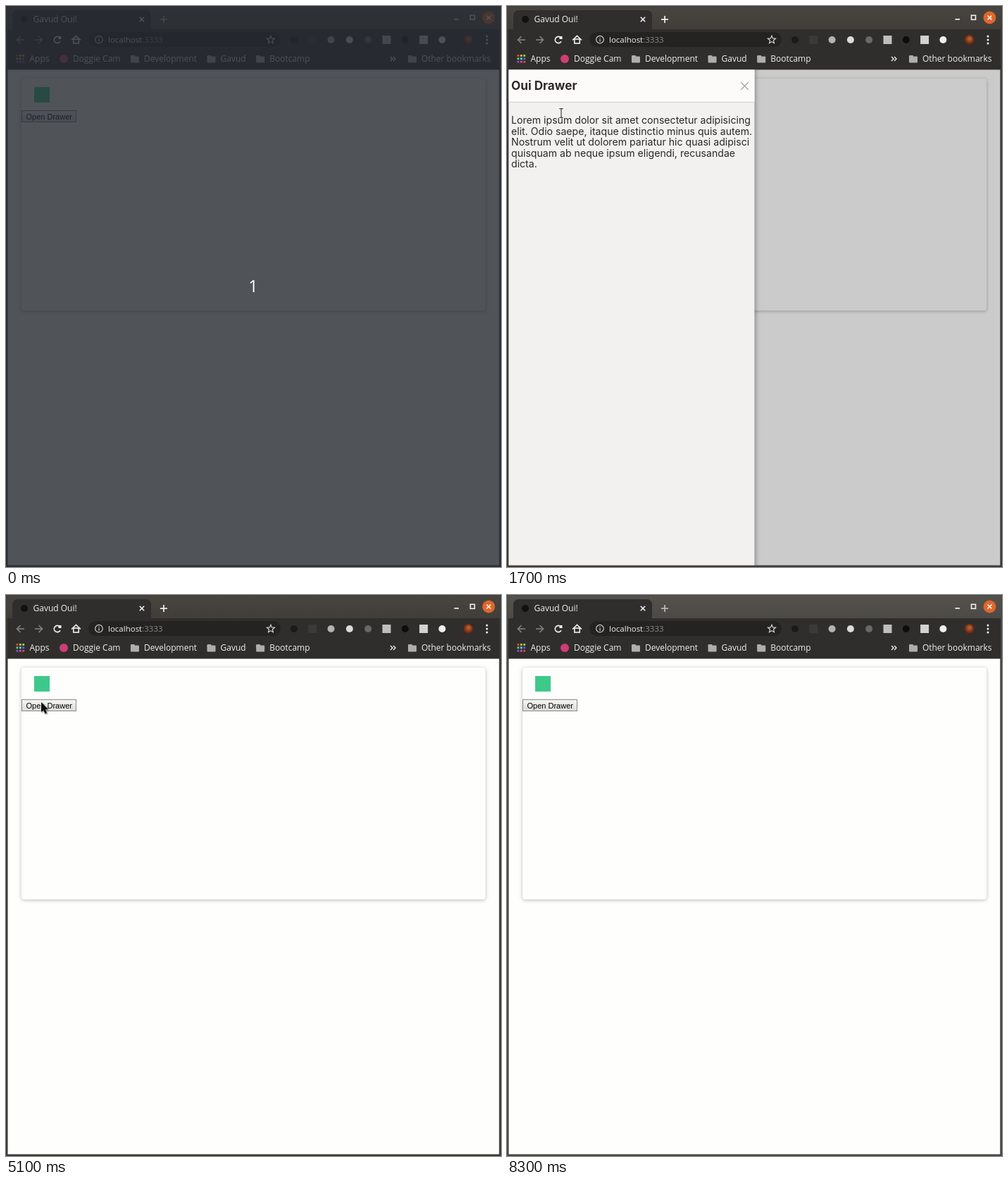
These frames come from a looping animation (703 by 796 pixels, 8400 ms). An HTML page with a canvas:

```html
<!DOCTYPE html>
<html lang="en">
<head>
<meta charset="utf-8">
<title>Drawer demo</title>
<style>
  html, body { margin: 0; width: 100%; height: 100%; overflow: hidden; background: #3c3a37; }
  canvas { display: block; }
</style>
</head>
<body>
<canvas id="stage" width="703" height="796"></canvas>
<script>
const g = document.getElementById('stage').getContext('2d');
const LOOP = 8400, STEP = 100, TURN = Math.PI * 2;
const UI = '"Open Sans", "Noto Sans", sans-serif';
const BODY = 'Inter, "Open Sans", sans-serif';
const LIGHT = '#f1f0ee', BAR = '#302e2d', DIM = '#858381', INK = '#0a0a0a';

const LOREM = [
  'Lorem ipsum dolor sit amet consectetur adipisicing',
  'elit. Odio saepe, itaque distinctio minus quis autem.',
  'Nostrum velit ut dolorem pariatur hic quasi adipisci',
  'quisquam ab neque ipsum eligendi, recusandae',
  'dicta.'
];

// pointer moves: start, end, and where each one arrives
const ENTRY = { x: 260, y: 28 };
const MOVES = [
  { from: 500, to: 1100, x: 77, y: 152 },
  { from: 2000, to: 2200, x: 86, y: 178 },
  { from: 2300, to: 2500, x: 135, y: 208 },
  { from: 2500, to: 2700, x: 309, y: 140 },
  { from: 2800, to: 3300, x: 347, y: 109 },
  { from: 3400, to: 3500, x: 332, y: 109 },
  { from: 4400, to: 4800, x: 50, y: 152 },
  { from: 5400, to: 5900, x: 579, y: 257 },
  { from: 6700, to: 7300, x: 640, y: 17 }
];

const clamp = v => Math.max(0, Math.min(1, v));
const span = (t, start, len) => clamp((t - start) / len);
const easeOut = p => 1 - Math.pow(1 - p, 2.83);

function rect(x, y, w, h, fill) {
  g.fillStyle = fill;
  g.fillRect(x, y, w, h);
}

function round(x, y, w, h, r, fill) {
  g.beginPath();
  g.roundRect(x, y, w, h, r);
  g.fillStyle = fill;
  g.fill();
}

function disc(x, y, r, fill) {
  g.beginPath();
  g.arc(x, y, r, 0, TURN);
  g.fillStyle = fill;
  g.fill();
}

function ring(x, y, r, color, width, a = 0, b = TURN) {
  g.beginPath();
  g.arc(x, y, r, a, b);
  g.strokeStyle = color;
  g.lineWidth = width;
  g.stroke();
}

function line(color, width, ...pts) {
  g.strokeStyle = color;
  g.lineWidth = width;
  g.beginPath();
  for (let i = 0; i < pts.length; i += 2) g.lineTo(pts[i], pts[i + 1]);
  g.stroke();
}

function cross(x, y, r, color, width) {
  line(color, width, x - r, y - r, x + r, y + r);
  line(color, width, x + r, y - r, x - r, y + r);
}

// a chevron with its tip at x, y; a negative size points right
function chevron(x, y, s, color, width) {
  line(color, width, x + s, y - Math.abs(s), x, y, x + s, y + Math.abs(s));
}

function text(s, x, y, font, color, align = 'left') {
  g.font = font;
  g.fillStyle = color;
  g.textAlign = align;
  g.fillText(s, x, y);
  return g.measureText(s).width;
}

function shadow(color, blur, x, y) {
  g.shadowColor = color;
  g.shadowBlur = blur;
  g.shadowOffsetX = x;
  g.shadowOffsetY = y;
}

function fade(y0, y1, top, bottom) {
  const f = g.createLinearGradient(0, y0, 0, y1);
  f.addColorStop(0, top);
  f.addColorStop(1, bottom);
  return f;
}

function titleBar(focused) {
  rect(0, 0, 703, 796, focused ? '#3c3a37' : '#474541');
  rect(1, 1, 701, 32, focused ? fade(0, 33, '#484540', '#413e3a') : fade(0, 33, '#55524d', '#4c4a46'));
  rect(2, 33, 699, 57, BAR);
  round(9, 6, 197, 28, [7, 7, 0, 0], BAR);
  disc(26, 19, 5, '#121110');
  text('Gavud Oui!', 38.5, 23, '12px ' + UI, LIGHT);
  cross(193, 19, 3.2, LIGHT, 1.6);
  const plus = focused ? LIGHT : '#bdbbb8';
  rect(219, 18.2, 10, 1.7, plus);
  rect(223.2, 14, 1.7, 10, plus);

  rect(636.5, 18, 6.5, 1.7, LIGHT);
  g.strokeStyle = LIGHT;
  g.lineWidth = 1.6;
  g.strokeRect(659.5, 13.3, 6, 6);
  disc(685.5, 16.5, 9, '#e0662c');
  cross(685.5, 16.5, 3, '#fff', 1.5);
}

function star(x, y, r) {
  g.beginPath();
  for (let i = 0; i < 10; i++) {
    const d = i % 2 ? r * 0.45 : r, a = i * TURN / 10;
    g.lineTo(x + d * Math.sin(a), y - d * Math.cos(a));
  }
  g.closePath();
  g.strokeStyle = '#d6d4d2';
  g.lineWidth = 1.2;
  g.stroke();
}

function toolbar() {
  for (const [x, s] of [[15.5, 5], [51.5, -5]]) {
    chevron(x, 48, s, DIM, 1.6);
    line(DIM, 1.6, x, 48, x + 2.1 * s, 48);
  }
  ring(73, 48, 4.6, LIGHT, 1.7, 0.5, 5.6);
  rect(74.5, 43, 4, 4, LIGHT);
  line(LIGHT, 1.6, 93, 48.5, 99.5, 42.3, 106, 48.5);
  g.strokeRect(95.8, 47, 7.4, 6);

  round(117, 37, 273, 21, 10.5, '#242322');
  ring(132, 47.7, 5.3, '#d0cecc', 1.2);
  rect(131.4, 47, 1.3, 3.6, '#d0cecc');
  rect(131.4, 44.6, 1.3, 1.3, '#d0cecc');
  const w = text('localhost', 145, 52, '11.5px ' + UI, LIGHT);
  text(':3333', 145 + w, 52, '11.5px ' + UI, '#8d8b89');
  star(376, 48, 5.8);

  const tones = ['#1b1a19', '#3c3a39', '#b5b3b1', '#dddbd9', '#6b6967', '#c0bebc', '#0e0d0d', '#d4d2d0', '#f0efee'];
  tones.forEach((c, i) => {
    const x = 409 + i * 26.3;
    if (i % 2 && i !== 3) rect(x - 6, 42, 12, 12, c);
    else disc(x, 48, 5, c);
  });
  const photo = g.createRadialGradient(657, 46, 1, 656.5, 48, 8);
  photo.addColorStop(0, '#c0602f');
  photo.addColorStop(1, '#431a10');
  disc(656.5, 48, 7.5, photo);
  for (let i = -1; i < 2; i++) disc(683, 48 + 5 * i, 1.5, LIGHT);
}

function folder(x) {
  round(x, 70, 6, 4, 1, '#b0aeac');
  round(x, 71.5, 12, 9, 1, '#b0aeac');
}

function bookmarks() {
  const font = '12px ' + UI;
  let x = 14.5;
  ['Apps', 'Doggie Cam', 'Development', 'Gavud', 'Bootcamp'].forEach((name, i) => {
    if (i > 1) folder(x);
    else if (i) disc(x + 6, 75, 6, '#cf3d76');
    else for (let k = 0; k < 9; k++)
      rect(x + k % 3 * 4.4, 69 + Math.floor(k / 3) * 4.4, 2.8, 2.8, `hsl(${k * 45},70%,58%)`);
    x += 33.5 + text(name, x + 19, 79, font, LIGHT);
  });
  for (const tip of [549, 553]) chevron(tip, 75, -3, LIGHT, 1.4);
  folder(571);
  text('Other bookmarks', 688.5, 79, font, LIGHT, 'right');
}

function page() {
  rect(2, 90, 699, 704, '#fefefd');
  g.save();
  shadow('rgba(0,0,0,.28)', 5, 0, 1);
  round(22, 103, 659, 329, 4, '#fefefd');
  g.restore();
  rect(40, 115, 22, 22, '#3dc98b');
  rect(22, 148, 78, 17, '#8c8b8a');
  rect(23, 149, 76, 15, fade(149, 164, '#f5f5f4', '#dcdcdb'));
  text('Open Drawer', 28.5, 160.5, '11px "Liberation Sans", Arial, sans-serif', '#000');
}

function drawer(edge) {
  g.save();
  g.translate(edge - 352, 0);
  g.save();
  shadow('rgba(0,0,0,.35)', 6, 1, 0);
  rect(2, 84, 349.5, 716, '#f2f1f0');
  g.restore();
  rect(2, 90, 349.5, 46, '#fcfbf9');
  rect(2, 136, 349.5, 1, '#d3d2d0');
  text('Oui Drawer', 6, 119.3, 'bold 17.2px ' + BODY, '#2d2926');
  cross(337.5, 113.5, 5.3, '#999795', 1.2);
  LOREM.forEach((s, i) => text(s, 6, 167 + i * 15.6, '14.12px ' + BODY, '#2a2827'));
  g.restore();
}

function place(t) {
  let { x, y } = ENTRY;
  for (const m of MOVES) {
    const p = span(t, m.from, m.to - m.from);
    x += (m.x - x) * p;
    y += (m.y - y) * p;
  }
  return [x, y];
}

function arrow() {
  const shape = new Path2D('M0 0V14L3.2 11.2L5.5 16.5L8 15.4L5.8 10.3H10Z');
  shadow('rgba(0,0,0,.35)', 2, 1, 1);
  g.strokeStyle = '#fff';
  g.lineWidth = 0.8;
  g.stroke(shape);
  g.fillStyle = INK;
  g.fill(shape);
}

function beam() {
  for (const [c, w] of [['#fff', 2.6], ['#222', 1.1]]) {
    line(c, w, 0, -6, 0, 6);
    for (const y of [-6.3, 6.3]) line(c, w, -2.7, y, 2.7, y);
  }
}

function hand() {
  shadow('rgba(0,0,0,.4)', 2, 1, 1);
  round(1, 0, 2.6, 9, 1.3, INK);
  round(1, 4.5, 8, 9.5, 2.5, INK);
  round(-1.2, 6, 5, 4.5, 2, INK);
}

function pointer(t, edge) {
  if (t < 500 || t > 7300) return;
  const [x, y] = place(t);
  const onText = edge > x && x < 347 && y >= 150 && y < 232;
  g.save();
  g.translate(x, y);
  if (t >= 3500 && t < 3900) hand();
  else if (onText) beam();
  else arrow();
  g.restore();
}

function draw(t) {
  const slide = easeOut(span(t, 1500, 200)) - easeOut(span(t, 3800, 300))
    + easeOut(span(t, 5100, 200)) - easeOut(span(t, 6600, 300));
  const shade = span(t, 1445, 200) - span(t, 3800, 250)
    + span(t, 5100, 200) - span(t, 6600, 250);
  const edge = 2 + 350 * slide;

  titleBar(t >= 1400 && t < 8300);
  toolbar();
  bookmarks();
  g.save();
  g.beginPath();
  g.rect(2.5, 90.4, 697.8, 703.2);
  g.clip();
  page();
  rect(2, 90, 699, 704, `rgba(0,0,0,${0.2 * clamp(shade)})`);
  if (slide > 0.001) drawer(edge);
  g.restore();
  pointer(t, edge);

  if (t < 300) {
    rect(0, 0, 703, 796, 'rgba(37,42,49,.8)');
    text('1', 351, 406, '24px ' + UI, '#fff', 'center');
  }
}

const start = performance.now();
function tick() {
  const t = (performance.now() - start) % LOOP;
  draw(Math.floor(t / STEP) * STEP);
  requestAnimationFrame(tick);
}
tick();
</script>
</body>
</html>
```
